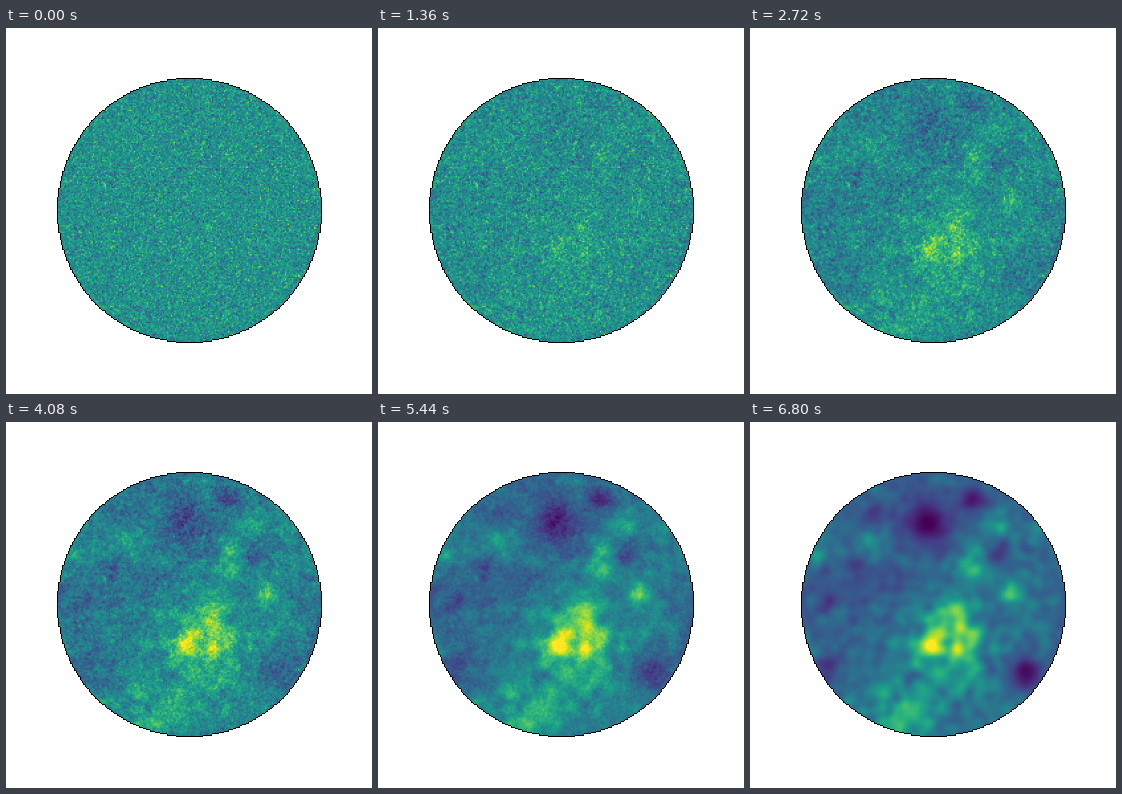
A matplotlib script for the animation above (8 s loop, 366 px wide and 366 px high).

```python
import numpy as np
import matplotlib.pyplot as plt
from matplotlib.animation import FuncAnimation

SIZE = 366
CELLS = 200
LEFT, TOP, WIDTH = 51, 50, 265  # pixel box of the disk
STAGES = 6
STEP_MS = 80
STEPS_PER_STAGE = 17
TOTAL_STEPS = 100

# Hollows and hills of the smooth field: x, y, radius, height.
SPOTS = [
    (165, 90, 38, -0.10), (178, 101, 14, -0.27), (222, 77, 9, -0.26),
    (275, 250, 13, -0.34), (248, 132, 9, -0.20), (120, 97, 9, -0.12),
    (78, 243, 9, -0.22), (110, 160, 30, -0.11), (200, 235, 38, 0.18),
    (202, 188, 9, 0.36), (180, 222, 9, 0.36), (213, 213, 12, 0.28),
    (150, 292, 20, 0.28), (222, 142, 11, 0.26), (259, 173, 7, 0.32),
    (122, 120, 13, 0.18), (68, 130, 10, 0.20), (245, 105, 10, 0.20),
]

rng = np.random.default_rng(7)
center = (np.arange(CELLS) + 0.5) * WIDTH / CELLS - 0.5
xs, ys = np.meshgrid(LEFT + center, TOP + center)
offset = np.arange(CELLS) - (CELLS - 1) / 2
disk = np.hypot(offset[:, None], offset) <= CELLS / 2
freq = 2 * np.pi * np.fft.fftfreq(CELLS)
k = np.hypot(freq[:, None], freq)
k[0, 0] = freq[1]


def filtered(noise, gain):
    field = np.fft.ifft2(np.fft.fft2(noise) * gain).real
    return (field - field.mean()) / field.std()


def smooth_relief():
    field = np.full((CELLS, CELLS), 0.35)
    for x, y, r, height in SPOTS:
        field += height * np.exp(-((xs - x) ** 2 + (ys - y) ** 2) / (2 * r * r))
    texture = filtered(rng.standard_normal(field.shape), np.exp(-(3 * k) ** 2 / 2))
    return np.clip(field * (1 + 0.12 * texture), 0, 1)


def stage_field(stage):
    """Fade from white noise to the relief, the grain growing coarser."""
    t = stage / (STAGES - 1)
    ease = t * t * (3 - 2 * t)
    mean = relief[disk].mean()
    grain = 0.12 * (1 - t * t) * filtered(white, k ** -t)
    return 0.51 + (mean - 0.51) * t * t + ease * (relief - mean) + grain


def frame_overlay():
    """White surround and black stepped rim over a clear disk."""
    cell = ((np.arange(WIDTH) + 0.5) * CELLS / WIDTH).astype(int)
    mask = np.zeros((SIZE, SIZE), bool)
    mask[TOP:TOP + WIDTH, LEFT:LEFT + WIDTH] = disk[np.ix_(cell, cell)]
    inner = mask.copy()
    for axis in (0, 1):
        for shift in (-1, 1):
            inner &= np.roll(mask, shift, axis)
    overlay = np.zeros((SIZE, SIZE, 4))
    overlay[~mask] = 1
    overlay[mask & ~inner, 3] = 1
    return overlay


relief = smooth_relief()
white = rng.standard_normal((CELLS, CELLS))
fields = [stage_field(s) for s in range(STAGES)]

fig = plt.figure(figsize=(SIZE / 100, SIZE / 100), dpi=100, facecolor="white")
ax = fig.add_axes([0, 0, 1, 1])
ax.axis("off")
x0, y0 = LEFT - 0.5, TOP - 0.5
picture = ax.imshow(fields[0], cmap="viridis", vmin=0, vmax=1, aspect="auto",
                    interpolation="hanning",
                    extent=(x0, x0 + WIDTH, y0 + WIDTH, y0))
ax.imshow(frame_overlay(), interpolation="nearest", aspect="auto")
ax.set(xlim=(-0.5, SIZE - 0.5), ylim=(SIZE - 0.5, -0.5))


def update(step):
    picture.set_data(fields[min(step // STEPS_PER_STAGE, STAGES - 1)])
    return (picture,)


anim = FuncAnimation(fig, update, frames=TOTAL_STEPS, interval=STEP_MS,
                     repeat=True, repeat_delay=0, blit=False)
plt.show()
```
